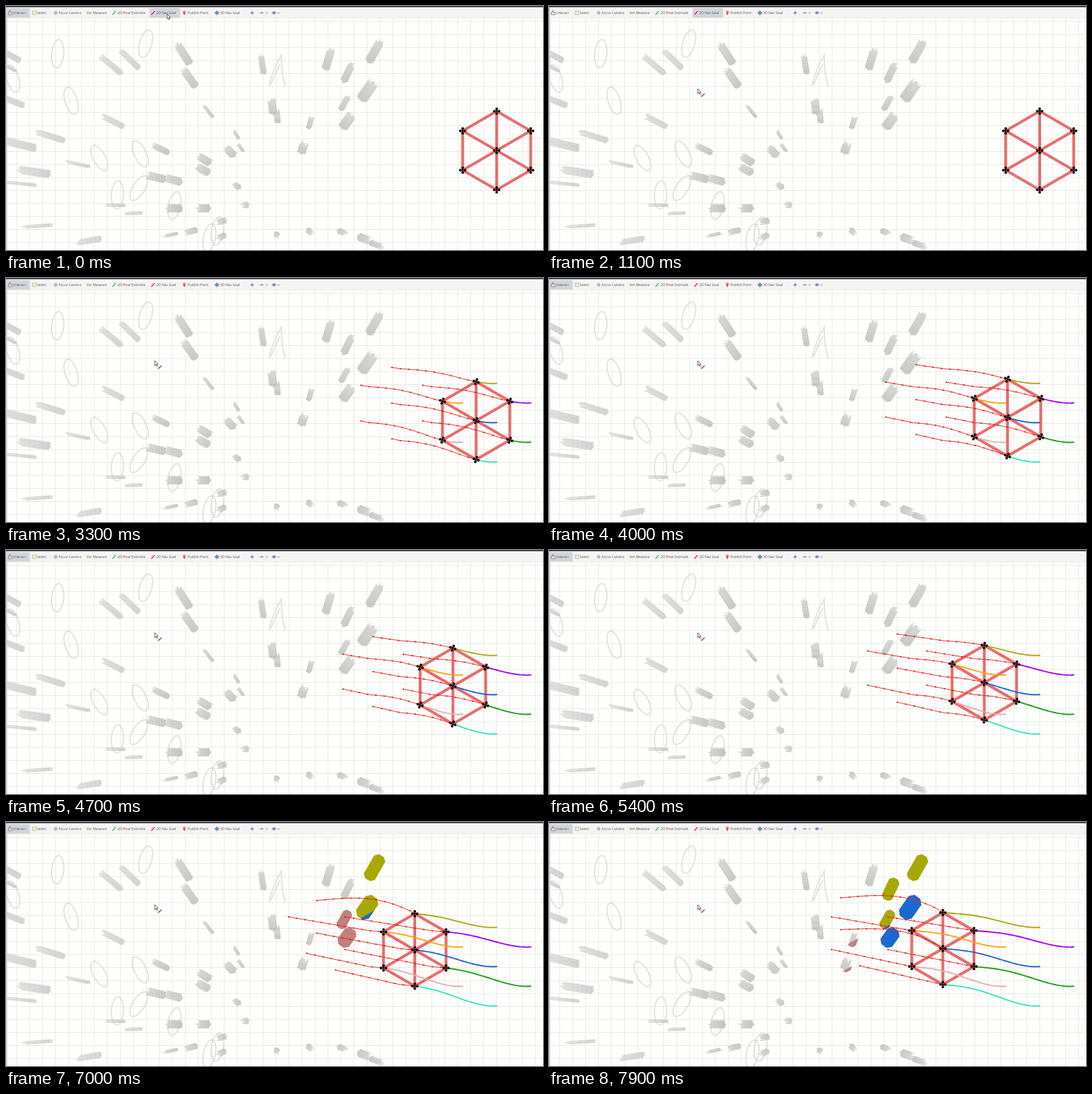
An HTML page with a canvas that plays this animation: 800 px wide and 363 px high, repeating every 8000 ms.

```html
<!DOCTYPE html>
<html lang="en">
<head>
<meta charset="utf-8">
<title>Formation flight</title>
<style>
  html, body { margin: 0; width: 100%; height: 100%; overflow: hidden; background: #fefefc; }
  canvas, svg { position: absolute; left: 0; top: 0; width: 800px; height: 363px; }
  text { font: 5.1px "Open Sans", "Noto Sans", sans-serif; fill: #555; }
  .on { fill: #d1d5dc; animation: 8s step-end infinite; }
  #interact { animation-name: interact; }
  #nav { animation-name: nav; }
  #cursor { animation: move 8s linear infinite; }
  #goal { animation: goal 8s step-end infinite; }
  @keyframes interact { 0% { opacity: 1 } 1.25% { opacity: 0 } 17.5%, 100% { opacity: 1 } }
  @keyframes nav { 0% { opacity: 1 } 17.5%, 100% { opacity: 0 } }
  @keyframes goal { 0% { opacity: 0 } 6.25%, 100% { opacity: 1 } }
  @keyframes move {
    0%, 5% { transform: translate(240px, 12px) }
    7.5% { transform: translate(254px, 36px) }
    10% { transform: translate(246px, 80px) }
    13.75%, 100% { transform: translate(221.5px, 123px) }
  }
</style>
</head>
<body>
<canvas id="map"></canvas>
<canvas id="live"></canvas>
<svg viewBox="0 0 800 363">
  <rect width="800" height="18" fill="#f5f4f2"/>
  <rect width="800" height="1.7" fill="#2b2e39"/>
  <rect y="17.6" width="800" height=".7" fill="#e4e3e1"/>
  <rect y="2" width="1.8" height="361" fill="#d0d2da"/>
  <rect id="interact" class="on" x="2" y="3" width="33.5" height="14.4"/>
  <rect id="nav" class="on" x="214" y="3" width="45.5" height="14.4"/>
  <g fill="none" stroke-width=".7">
    <path d="M3.5 12.8V9.5H5V7h1.3v2.5h3v3.3z" fill="#fff" stroke="#555"/>
    <rect x="39.2" y="7.6" width="5.4" height="5.2" fill="#f3ecc0" stroke="#8b8570" stroke-dasharray="1 .6"/>
    <circle cx="74" cy="10.2" r="1.9" stroke="#888"/>
    <path d="M74 7v6.4M70.8 10.2h6.4" stroke="#999"/>
    <rect x="120.6" y="9.1" width="6.8" height="2" fill="#d9cfa4" stroke="#8f8a72" stroke-width=".5"/>
    <path d="M158.5 13l5-5.2" stroke="#38c638" stroke-width="1.5"/>
    <path d="M216.5 13l5-5.2" stroke="#dc1cab" stroke-width="1.5"/>
    <path d="M265.7 13.6C262.6 9 264 7.2 265.7 7.2s3.1 1.8 0 6.4z" fill="#c4402f"/>
    <circle cx="265.7" cy="9.1" r=".8" fill="#fff"/>
    <path d="M310.8 10.2l3.4-3.1 3.4 3.1-3.4 3.1z" fill="#6b8cbc" stroke="#4c6a96" stroke-width=".5"/>
    <path d="M355.5 5v11" stroke="#e4e2e0"/>
    <path d="M364.3 10.2h4.8M366.7 7.8v4.8M378.6 10.2h4.8" stroke="#5a88c8" stroke-width="1.5"/>
    <path d="M386.6 9.7l1.5 1.5 1.5-1.5M404.4 9.7l1.5 1.5 1.5-1.5" stroke="#555"/>
    <ellipse cx="399.2" cy="10.2" rx="2.9" ry="1.7" fill="#dce5f4" stroke="#536a96"/>
    <circle cx="399.2" cy="10.2" r="1.1" fill="#34517f"/>
  </g>
  <text x="11" y="12">Interact</text>
  <text x="46" y="12">Select</text>
  <text x="78.5" y="12">Focus Camera</text>
  <text x="129.5" y="12">Measure</text>
  <text x="166.3" y="12">2D Pose Estimate</text>
  <text x="224" y="12">2D Nav Goal</text>
  <text x="270.3" y="12">Publish Point</text>
  <text x="319" y="12">3D Nav Goal</text>
  <g id="cursor">
    <path d="M0 0v7.2l1.7-1.5 1.2 2.6 1.2-.6L2.9 5.2h2.2z" fill="#fff" stroke="#333" stroke-width=".8"/>
    <path id="goal" d="M5 12l5.3-4.6" stroke="#c71c96" stroke-width="1.5"/>
  </g>
</svg>
<script>
const W = 800, H = 363, LOOP = 8000, STEP = 100;
const START = 1600, RAMP = 920, SPEED = .0247, BEND = 144;
const OLIVE = '#a8a804', BLUE = '#1c68d2', ROSE = '#c08080';

function layer(id) {
  const el = document.getElementById(id), k = window.devicePixelRatio || 1;
  el.width = W * k;
  el.height = H * k;
  const c = el.getContext('2d');
  c.scale(k, k);
  return c;
}
const map = layer('map'), live = layer('live');

let seed = 7;
const rand = () => (seed = seed * 16807 % 2147483647) / 2147483647;
const clamp = v => Math.max(0, Math.min(1, v));
const smooth = v => v * v * (3 - 2 * v);

// Middles of the columns, by width
const groups = {
  5.5: [[-8,85], [23,264], [48,327], [190,308], [163,296], [343,191], [350,211], [246,340], [107,235], [302,157]],
  9: [[-3,68], [3,139], [67,194], [185,80], [157,88], [160,172], [124,349], [231,213], [344,268], [357,296],
      [382,88], [404,165], [403,340], [452,335], [276,335], [321,343], [322,320], [551,355], [500,336]],
  12: [[21,206], [43,247], [224,255], [250,259], [251,301], [295,301], [296,229], [294,244], [265,72],
       [274,108], [334,217], [397,150], [480,80], [533,346]]
};
const seen = {
  big: [538,127,17], mid: [508,172,15], high: [549,68,13], upper: [509,100,11],
  small: [504,145,9], far: [453,174,8], low: [442,212,13]
};
// Rings: centre and tilt
const rings = [
  [77,71,.1], [208,56,.28], [97,141,-.3], [10,108,-.3], [139,226,-.5], [200,220,-.45],
  [166,281,.05], [198,271,.55], [251,297,.22], [303,345,.2], [315,335,.15]
];

// Seen from above, every column leans away from the camera's foot point
function lean([x, y, w]) {
  const dx = x - 415, dy = y - 302;
  return { angle: Math.atan2(dy, dx), half: (.11 * Math.hypot(dx, dy) + .6 * w) / 2 };
}

function column(c, [x, y, w]) {
  const { angle, half } = lean([x, y, w]);
  const tone = x < 205 ? '205,205,205' : '193,193,193';
  const fade = c.createLinearGradient(-half, 0, half, 0);
  fade.addColorStop(0, `rgba(${tone},.95)`);
  fade.addColorStop(1, `rgba(${tone},.6)`);
  c.save();
  c.translate(x, y);
  c.rotate(angle);
  c.strokeStyle = fade;
  c.lineWidth = 1.2;
  for (let o = .5 - w / 2; o < w / 2; o++) {
    const cut = Math.abs(o) / w * 5;
    c.beginPath();
    c.moveTo(cut - half - 1 + 2 * rand(), o);
    c.lineTo(half - cut + 3 - 6 * rand(), o);
    c.stroke();
  }
  c.restore();
}

function drawMap(c) {
  const gap = 19.33;
  c.strokeStyle = '#e9e9e3';
  c.lineWidth = 1;
  c.beginPath();
  for (let x = 731 % gap; x < W; x += gap) { c.moveTo(x, 18); c.lineTo(x, H); }
  for (let y = 216.5 % gap; y < H; y += gap) { c.moveTo(0, y); c.lineTo(W, y); }
  c.stroke();
  c.strokeStyle = 'rgba(195,195,195,.45)';
  c.lineWidth = 2;
  for (const [x, y, tilt] of rings) {
    c.beginPath();
    c.ellipse(x, y, 9, 21, tilt, 0, 7);
    c.stroke();
  }
  c.beginPath();
  c.moveTo(392, 119);
  c.quadraticCurveTo(396, 98, 410, 73);
  c.quadraticCurveTo(410, 100, 416, 120);
  c.moveTo(394, 117);
  c.lineTo(408, 86);
  c.stroke();
  for (const w in groups) groups[w].forEach(([x, y]) => column(c, [x, y, +w]));
  Object.values(seen).forEach(p => column(c, p));
}

// Columns take the colour of the drone that detects them: start and end of the sweep
const paints = [
  ['mid', ROSE, 5500, 5900], ['big', OLIVE, 5900, 6400], ['high', OLIVE, 6600, 6900],
  ['small', ROSE, 6600, 6800], ['big', BLUE, 6850, 7400], ['mid', BLUE, 7100, 7700],
  ['small', OLIVE, 7200, 7600], ['upper', OLIVE, 7600, 7800], ['small', BLUE, 7800, 8200],
  ['far', ROSE, 7700, 8200], ['low', ROSE, 7800, 8200]
];

function paint(c, t, [name, colour, t0, t1]) {
  const f = clamp((t - t0) / (t1 - t0));
  if (!f) return;
  const [x, y, w] = seen[name], { angle, half } = lean(seen[name]);
  const l = half + 2, h = w / 2 + 3, r = l + 2, cut = h * .55;
  c.save();
  c.translate(x, y);
  c.rotate(1.05);
  c.beginPath();
  c.rect(r - 2 * r * f, -r, 2 * r * f, 2 * r);
  c.clip();
  c.rotate(angle - 1.05);
  c.beginPath();
  for (const s of [1, -1]) {
    c.lineTo(s * l, s * (cut - h));
    c.lineTo(s * l, s * (h - cut));
    c.lineTo(s * (l - cut), s * h);
    c.lineTo(s * (cut - l), s * h);
  }
  c.fillStyle = colour;
  c.fill();
  c.restore();
}

// The centre drone, then the ring clockwise from the top; lag in steps, dodge is when its plan starts to bend
const drones = [
  { colour: BLUE, lag: 0, dodge: 7700 },
  { colour: '#a8a808', lag: 0, dodge: 6800 },
  { colour: '#a000fa', lag: 1 },
  { colour: '#14a010', lag: 1 },
  { colour: '#30e6c0', lag: 2 },
  { colour: '#e0b0ae', lag: 2 },
  { colour: '#ffa010', lag: 1 }
];

// Distance flown: a short acceleration, then steady speed
function flown(t) {
  const s = Math.max(0, t - START);
  return SPEED * (s < RAMP ? s * s / (2 * RAMP) : s - RAMP / 2);
}

// Place of drone i after distance d; the ring tightens on the way
function lane(i, d) {
  const u = clamp(d / BEND);
  const x = 731 - d, y = 215 - .185 * d + 3 * Math.sin(2 * Math.PI * u ** .8);
  if (!i) return [x, y];
  const r = 58.5 - 5 * smooth(u) - .04 * Math.max(0, d - BEND);
  const a = (i - 1) * Math.PI / 3;
  return [x + r * Math.sin(a), y - r * Math.cos(a)];
}

function line(c, pts, colour, width) {
  c.beginPath();
  pts.forEach(p => c.lineTo(p[0], p[1]));
  c.strokeStyle = colour;
  c.lineWidth = width;
  c.stroke();
}

function drawTrail(c, i, d) {
  const pts = [];
  for (let s = 0; s < d; s += 3) pts.push(lane(i, s));
  pts.push(lane(i, d));
  line(c, pts, drones[i].colour, 1.9);
}

function drawPlan(c, i, d, t) {
  const { lag, dodge } = drones[i];
  const round = Math.max(0, Math.floor((t - 1640 - lag * STEP) / 1040));
  const end = BEND + Math.max(0, 28 * round - 16);
  const point = s => {
    const [x, y] = lane(i, s), f = (s - d) / (end - d);
    return [x, t >= dodge ? y - 14 * Math.sin(Math.PI * f ** .8) : y];
  };
  const pts = [];
  for (let s = d; s < end; s += 3) pts.push(point(s));
  pts.push(point(end));
  line(c, pts, '#ee2a24', 1);
  c.fillStyle = '#e01010';
  for (let s = end; s > d; s -= 12.6) {
    const [x, y] = point(s);
    c.fillRect(x - .95, y - .95, 1.9, 1.9);
  }
}

function drawDrone(c, [x, y], turn) {
  c.fillStyle = '#080808';
  c.beginPath();
  c.arc(x, y, 1.4, 0, 7);
  for (let k = 0; k < 4; k++) {
    const a = turn + k * Math.PI / 2, px = x + 3.5 * Math.cos(a), py = y + 3.5 * Math.sin(a);
    c.moveTo(px, py);
    c.arc(px, py, 2, 0, 7);
  }
  c.fill();
}

function draw(t) {
  const c = live, d = flown(t);
  c.clearRect(0, 0, W, H);
  c.lineJoin = c.lineCap = 'round';
  paints.forEach(p => paint(c, t, p));
  const pos = drones.map((_, i) => lane(i, d));
  for (let i = 1; i < 7; i++) {
    line(c, [pos[0], pos[i]], '#e86c6a', 4.2);
    line(c, [pos[i], pos[i % 6 + 1]], '#e86c6a', 4.2);
  }
  if (t >= START) {
    drones.forEach((_, i) => drawTrail(c, i, d));
    drones.forEach((_, i) => drawPlan(c, i, d, t));
  }
  const turn = .4 * Math.sin(Math.PI * clamp(1.5 * d / BEND));
  pos.forEach(p => drawDrone(c, p, turn));
}

drawMap(map);
let start;
function tick(now) {
  start ??= now;
  draw(Math.floor((now - start) % LOOP / STEP) * STEP);
  requestAnimationFrame(tick);
}
draw(0);
requestAnimationFrame(tick);
</script>
</body>
</html>
```
